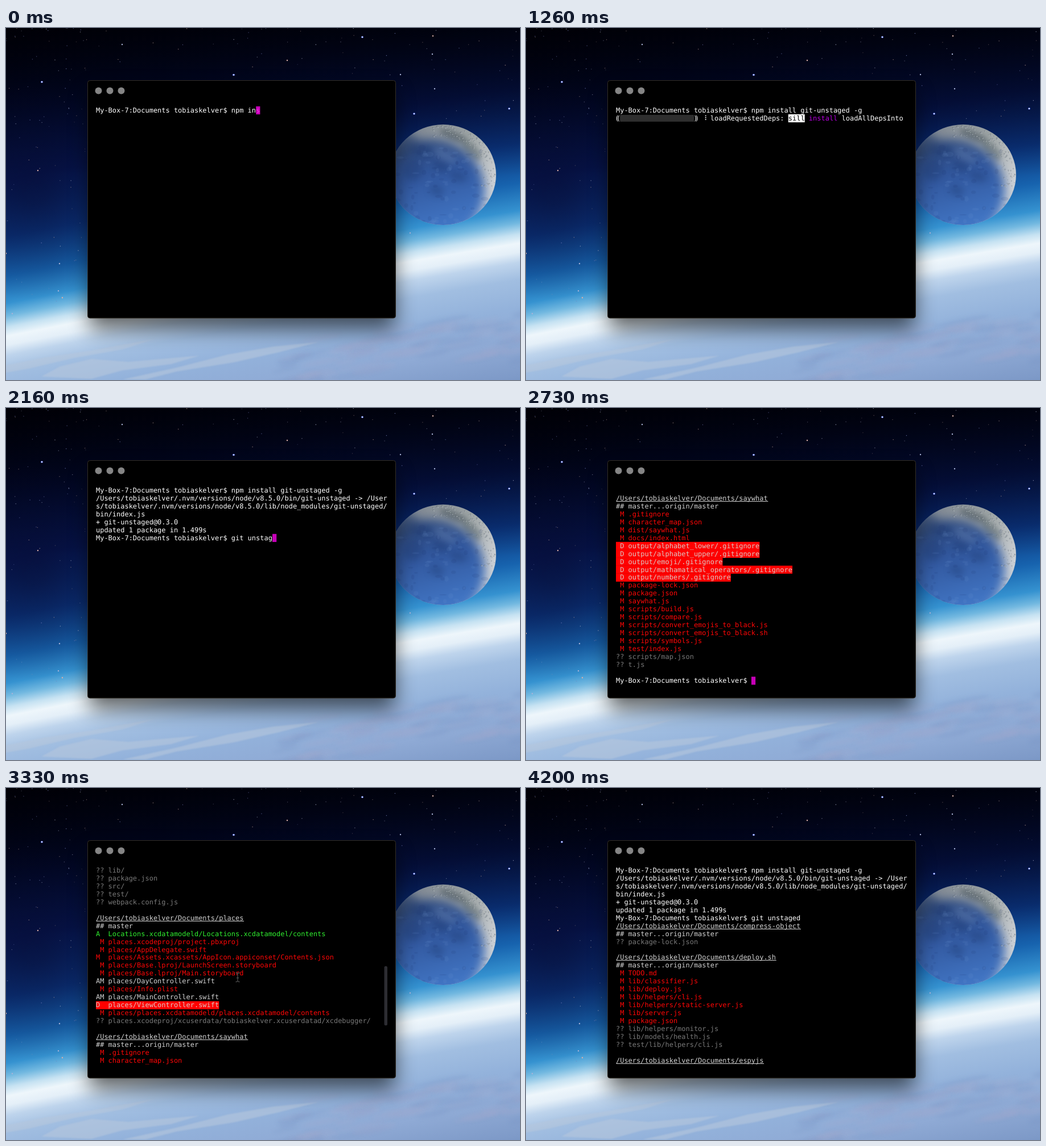
An HTML page with a canvas that plays this animation: 903 px wide and 620 px high, repeating every 4.23 s.

```html
<!DOCTYPE html>
<html lang="en">
<head>
<meta charset="utf-8">
<title>Terminal over a planet</title>
<style>
html, body { margin: 0; width: 100%; height: 100%; overflow: hidden; background: #000; }
canvas, svg { position: absolute; left: 0; top: 0; width: 903px; height: 620px; }
text { font: 11.976px "DejaVu Sans Mono", monospace; text-rendering: geometricPrecision; }
</style>
</head>
<body>
<canvas id="sky" width="903" height="620"></canvas>
<svg viewBox="0 0 903 620">
  <defs>
    <filter id="soft" x="-30%" y="-30%" width="160%" height="160%"><feGaussianBlur stdDeviation="18"/></filter>
    <pattern id="shade" width="2" height="2" patternUnits="userSpaceOnUse">
      <path d="M0 0h1v1h-1zM1 1h1v1h-1z" fill="#5c5c5c"/>
    </pattern>
  </defs>
  <rect x="146" y="112" width="537" height="418" rx="8" fill="#000" opacity=".6" filter="url(#soft)"/>
  <rect x="143.5" y="92.5" width="541" height="418.500" rx="4" fill="#000" stroke="#332e26"/>
  <g fill="#858585"><circle cx="162.5" cy="110.5" r="6"/><circle cx="182.5" cy="110.5" r="6"/><circle cx="202.5" cy="110.5" r="6"/></g>
  <g id="screen"></g>
  <rect id="thumb" x="664.5" width="5.5" height="104.5" rx="2.5" fill="#2d2d32"/>
  <path id="pointer" d="M403.500 325.500q3 0 3.500 2q.5-2 3.500-2M407 327v12M403.500 341.500q3 0 3.500-2q.5 2 3.500 2M405 334.500h4" fill="none" stroke="#4a4a4a" stroke-width="1.300"/>
</svg>
<script>
const LOOP = 4230, VISIBLE = 25;
const X0 = 158, Y0 = 138, CELL = 7.21, PITCH = 13.97;
const USER = 'tobiaskelver', PROMPT = `My-Box-7:Documents ${USER}$ `;
const INSTALL = 'npm install git-unstaged -g', STATUS = 'git unstaged';
const PALE = '#d2d2d2', RED = '#ff0606', GREY = '#787878';

// ---------- backdrop ----------
const c = document.getElementById('sky').getContext('2d');

function randomizer(seed) {
  return () => (seed = (seed * 16807) % 2147483647) / 2147483647;
}

function blob(x, y, rx, ry, fill, angle = 0) {
  c.fillStyle = fill;
  c.beginPath();
  c.ellipse(x, y, rx, ry, angle, 0, 7);
  c.fill();
}

function shape(fill, ...points) {
  c.fillStyle = fill;
  c.beginPath();
  points.forEach(([x, y]) => c.lineTo(x, y));
  c.fill();
}

function wash(gradient, ...stops) {
  stops.forEach(([at, color]) => gradient.addColorStop(at, color));
  c.fillStyle = gradient;
  c.fillRect(0, 0, 903, 620);
}

function drawAtmosphere() {
  const stops = [
    [-560, '#000005'], [-400, '#020a2c'], [-280, '#061650'], [-180, '#0b347e'],
    [-110, '#1763ae'], [-62, '#3592d0'], [-40, '#72b8e0'], [-20, '#c6e2f2'],
    [-4, '#eef6fb'], [12, '#e4eff8'], [30, '#bed4ec'], [60, '#a1bee1'],
    [110, '#93b2db'], [170, '#8faad5'], [230, '#7e9ac8'], [270, '#6c8bbc']
  ];
  const limb = c.createLinearGradient(0, -560, 0, 270);
  stops.forEach(([d, color]) => limb.addColorStop((d + 560) / 830, color));
  c.fillStyle = limb;
  for (let x = 0; x < 903; x++) {
    const y = 547 - 0.2 * x + 0.00002 * x * x;
    c.setTransform(1, 0, 0, 1, x, y);
    c.fillRect(0, -y, 1, 620);
  }
  c.resetTransform();
  wash(c.createLinearGradient(0, 0, 0, 260), [0, 'rgba(0,0,6,.8)'], [1, 'rgba(0,0,20,0)']);
  wash(c.createRadialGradient(50, 290, 20, 50, 290, 190), [0, 'rgba(6,8,40,.45)'], [1, 'rgba(6,8,40,0)']);
}

function drawClouds() {
  const rnd = randomizer(41);
  c.filter = 'blur(1px)';
  const pale = 'rgba(182,198,220,.6)';
  shape(pale, [0, 594], [70, 580], [150, 568], [262, 547], [205, 566], [120, 581], [40, 600], [0, 607]);
  shape(pale, [62, 614], [95, 596], [150, 583], [215, 588], [340, 577], [290, 592], [205, 603], [150, 618]);
  shape(pale, [205, 619], [300, 598], [390, 575], [470, 561], [550, 553], [480, 571], [400, 589], [300, 605], [245, 619]);
  c.filter = 'blur(3px)';
  for (let i = 0; i < 70; i++) {
    const x = 480 + 440 * rnd(), y = 640 - 0.16 * (x - 400) - 70 * rnd() + 28 * rnd();
    const tint = i % 3 ? '164,170,206' : '120,146,196';
    blob(x, y, 15 + 38 * rnd(), 2 + 5 * rnd(), `rgba(${tint},.22)`, -0.2);
  }
  c.filter = 'none';
}

function drawStars() {
  const rnd = randomizer(77);
  for (let i = 0; i < 170; i++) {
    const left = i % 5 < 2;
    const x = left ? 145 * rnd() : 903 * rnd();
    const y = left ? 500 * rnd() ** 1.6 : 170 * rnd() ** 1.5;
    const tint = ['190,160,150', '120,130,190', '170,175,200'][i % 3];
    blob(x, y, 0.7, 0.7, `rgba(${tint},${0.25 + 0.6 * rnd()})`);
  }
  [[626, 16], [400, 82.5], [63, 95], [717, 151], [884, 142]].forEach(([x, y]) => {
    blob(x, y, 2.2, 1.8, '#3c58d8');
    blob(x, y, 1.2, 1.2, '#e4e8ff');
  });
  [[750, 14], [749, 46], [753, 107], [494, 57], [693, 82], [204, 29], [56, 251],
   [94, 415], [92, 463], [99, 475], [11, 503], [710, 361], [0, 397]].forEach(([x, y], i) =>
    blob(x, y, 1.2, 1.2, i % 3 ? '#a9b4d8' : '#d9b0a8'));
}

function drawMoon() {
  const rnd = randomizer(9);
  c.save();
  c.beginPath();
  c.ellipse(768, 258.5, 93, 88.5, 0, 0, 7);
  c.clip();
  wash(c.createLinearGradient(730, 180, 862, 260), [0, '#858d96'], [0.5, '#9ca3a4'], [1, '#cdd1d5']);
  c.filter = 'blur(4px)';
  blob(786, 190, 26, 8, 'rgba(82,94,100,.6)', 0.4);
  blob(818, 216, 22, 10, 'rgba(96,108,112,.55)', 0.8);
  c.filter = 'blur(9px)';
  const dark = c.createLinearGradient(735, 190, 780, 350);
  dark.addColorStop(0, '#334d7e');
  dark.addColorStop(0.4, '#31569c');
  dark.addColorStop(1, '#4277c6');
  blob(744, 287, 97, 91, dark);
  blob(699, 208, 22, 26, 'rgba(44,68,112,.75)', 0.7);
  c.filter = 'blur(6px)';
  [[765, 243, 15, 12], [732, 217, 22, 13], [716, 250, 17, 20], [795, 262, 15, 9], [757, 287, 13, 9]]
    .forEach(([x, y, rx, ry]) => blob(x, y, rx, ry, 'rgba(24,50,104,.3)', 0.3));
  blob(772, 225, 24, 9, 'rgba(120,146,186,.3)', 0.5);
  c.filter = 'none';
  for (let i = 0; i < 120; i++) {
    const a = -1.8 + 2.1 * rnd(), k = 0.74 + 0.25 * rnd(), r = 0.6 + 1.6 * rnd();
    const x = 768 + 93 * k * Math.cos(a), y = 258.5 + 88.5 * k * Math.sin(a);
    blob(x, y, r, r * 0.7, 'rgba(70,80,92,.3)', 0.7);
    blob(x + 0.8, y + 0.7, r * 0.7, r * 0.5, 'rgba(225,229,231,.4)', 0.7);
  }
  for (let i = 0; i < 90; i++)
    blob(685 + 160 * rnd(), 210 + 135 * rnd(), 2 + 5 * rnd(), 1 + 4 * rnd(), i % 2 ? 'rgba(120,156,216,.1)' : 'rgba(20,45,100,.1)');
  c.restore();
}

drawAtmosphere();
drawClouds();
drawStars();
drawMoon();

// ---------- terminal contents ----------
const repo = (name, branch, ...files) => [`/Users/${USER}/Documents/${name}`, '## ' + branch, ...files, ''];
const marked = (mark, names) => names.split(' ').map(name => `${mark} ${name}`);
const ORIGIN = 'master...origin/master';

const installed = [
  PROMPT + INSTALL,
  `/Users/${USER}/.nvm/versions/node/v8.5.0/bin/git-unstaged -> /User`,
  `s/${USER}/.nvm/versions/node/v8.5.0/lib/node_modules/git-unstaged/`,
  'bin/index.js',
  '+ git-unstaged@0.3.0',
  'updated 1 package in 1.499s'
];

const finished = [
  ...installed,
  PROMPT + STATUS,
  ...repo('compress-object', ORIGIN, '?? package-lock.json'),
  ...repo('deploy.sh', ORIGIN,
    ...marked(' M', 'TODO.md lib/classifier.js lib/deploy.js lib/helpers/cli.js lib/helpers/static-server.js lib/server.js package.json'),
    ...marked('??', 'lib/helpers/monitor.js lib/models/health.js test/lib/helpers/cli.js')),
  ...repo('espyjs', 'wip', ' M index.js', ' D npm-debug.log', ' M package.json'),
  ...repo('grunt-screenshot', 'fixes-#22', ' M package.json', '?? package-lock.json'),
  ...repo('library', 'master',
    ...marked('??', '.babelrc .gitignore README.md docs/ index.js lib/ package.json src/ test/ webpack.config.js')),
  ...repo('places', 'master',
    'A  Locations.xcdatamodeld/Locations.xcdatamodel/contents',
    ...marked(' M', 'places.xcodeproj/project.pbxproj places/AppDelegate.swift'),
    'M  places/Assets.xcassets/AppIcon.appiconset/Contents.json',
    ...marked(' M', 'places/Base.lproj/LaunchScreen.storyboard places/Base.lproj/Main.storyboard'),
    'AM places/DayController.swift',
    ' M places/Info.plist',
    'AM places/MainController.swift',
    'D  places/ViewController.swift',
    ' M places/places.xcdatamodeld/places.xcdatamodel/contents',
    `?? places.xcodeproj/xcuserdata/${USER}.xcuserdatad/xcdebugger/`),
  ...repo('saywhat', ORIGIN,
    ...marked(' M', '.gitignore character_map.json dist/saywhat.js docs/index.html'),
    ...marked(' D', ['alphabet_lower', 'alphabet_upper', 'emoji', 'mathamatical_operators', 'numbers']
      .map(dir => `output/${dir}/.gitignore`).join(' ')),
    ...marked(' M', 'package-lock.json package.json saywhat.js scripts/build.js scripts/compare.js ' +
      'scripts/convert_emojis_to_black.js scripts/convert_emojis_to_black.sh scripts/symbols.js test/index.js'),
    ...marked('??', 'scripts/map.json t.js')),
  PROMPT
];
const LAST_TOP = finished.length - VISIBLE;

// ---------- terminal drawing ----------
const colX = col => X0 + col * CELL;
const rowY = row => Y0 + row * PITCH;
const baseline = row => Math.round(rowY(row) + 10.8);
const box = (x, y, w, h, fill) => `<rect x="${x}" y="${y}" width="${w}" height="${h}" fill="${fill}"/>`;
const cells = (row, col, count, fill) => box(colX(col), rowY(row), count * CELL, PITCH + 0.2, fill);
const label = (row, col, string, fill) =>
  `<text x="${colX(col)}" y="${baseline(row)}" fill="${fill}">${string.replace(/ /g, '\u00a0')}</text>`;
const isDeleted = string => /^( D |D  )/.test(string);

const drawBack = (string, row) => isDeleted(string) ? cells(row, 0, string.length, '#ff0000') : '';

function drawLine(string, row) {
  if (!string) return '';
  if (/^\/Users\/\w+\/Documents/.test(string))
    return label(row, 0, string, PALE) + box(X0 + 0.5, baseline(row) + 1, string.length * CELL, 1, PALE);
  const fills = { '## ': PALE, 'AM ': PALE, ' M ': RED, 'M  ': RED, '?? ': GREY, 'A  ': '#2fee2f' };
  return label(row, 0, string, isDeleted(string) ? '#dcc8c4' : fills[string.slice(0, 3)] || '#fff');
}

function drawProgress(t) {
  const spinner = '⠋⠙⠹⠸⠼⠴⠦⠧⠇⠏'[(Math.floor(t / 60) + 2) % 10];
  const paren = (col, glyph) => label(1, col, glyph, '#fff') + label(1, col + 0.35, glyph, '#fff');
  return paren(-0.25, '(') + box(colX(1), Math.round(rowY(1)) + 1, 18 * CELL, 12, 'url(#shade)') + paren(18.9, ')') +
    label(1, 21, spinner, '#fff') + label(1, 23, 'loadRequestedDeps:', '#fff') +
    cells(1, 42, 4, '#fff') + label(1, 42, 'sill', '#000') +
    label(1, 47, 'install', '#b800e0') + label(1, 55, 'loadAllDepsInto', '#fff');
}

// ---------- timeline ----------
function along(t, points) {
  const next = points.findIndex(([time]) => time >= t);
  if (next < 0) return points[points.length - 1][1];
  if (next === 0) return points[0][1];
  const [t0, v0] = points[next - 1], [t1, v1] = points[next];
  return v0 + (v1 - v0) * (t - t0) / (t1 - t0);
}

// The block cursor trails the freshly typed letter for a moment.
function typing(before, command, progress) {
  const typed = Math.max(0, Math.min(command.length, progress));
  const caret = progress > command.length + 1 ? command.length : Math.max(0, Math.floor(typed - 0.3));
  return {
    lines: [...before, PROMPT + command.slice(0, Math.floor(typed))],
    cursor: [before.length, PROMPT.length + caret]
  };
}

function stateAt(t) {
  if (t < 810) return typing([], INSTALL, 7.1 + t / 36);
  if (t < 900) return { lines: [PROMPT + INSTALL], cursor: [1, 0] };
  if (t < 1500) return { lines: [PROMPT + INSTALL], loading: true };
  if (t < 2310) return typing(installed, STATUS, (t - 1656) / 48);
  if (t < 2550) return { lines: [...installed, PROMPT + STATUS], cursor: [7, 0] };
  const top = Math.round(along(t, [[3120, LAST_TOP], [3330, 42], [3540, 7], [3630, 0]]));
  return { lines: finished, top, cursor: [finished.length - 1, PROMPT.length] };
}

const [screenGroup, thumb, pointer] = ['screen', 'thumb', 'pointer'].map(id => document.getElementById(id));
let shown = '';

function render(t) {
  const { lines, top = 0, cursor, loading } = stateAt(t);
  const visible = lines.slice(top, top + VISIBLE);
  let markup = [...visible.map(drawBack), ...visible.map(drawLine)].join('');
  if (loading) markup += drawProgress(t);
  if (cursor && cursor[0] - top < VISIBLE)
    markup += cells(cursor[0] - top, cursor[1], 1, 'rgba(248,0,229,.8)');
  if (markup !== shown) screenGroup.innerHTML = shown = markup;

  thumb.setAttribute('y', 139 + top * 4.16);
  thumb.setAttribute('opacity', along(t, [[3090, 0], [3120, 1], [3780, 1], [3960, 0]]));
  pointer.setAttribute('opacity', t >= 3090 && t < 3960 ? 1 : 0);
}

const start = performance.now();
function tick() {
  render((performance.now() - start) % LOOP);
  requestAnimationFrame(tick);
}
render(0);
requestAnimationFrame(tick);
</script>
</body>
</html>
```
